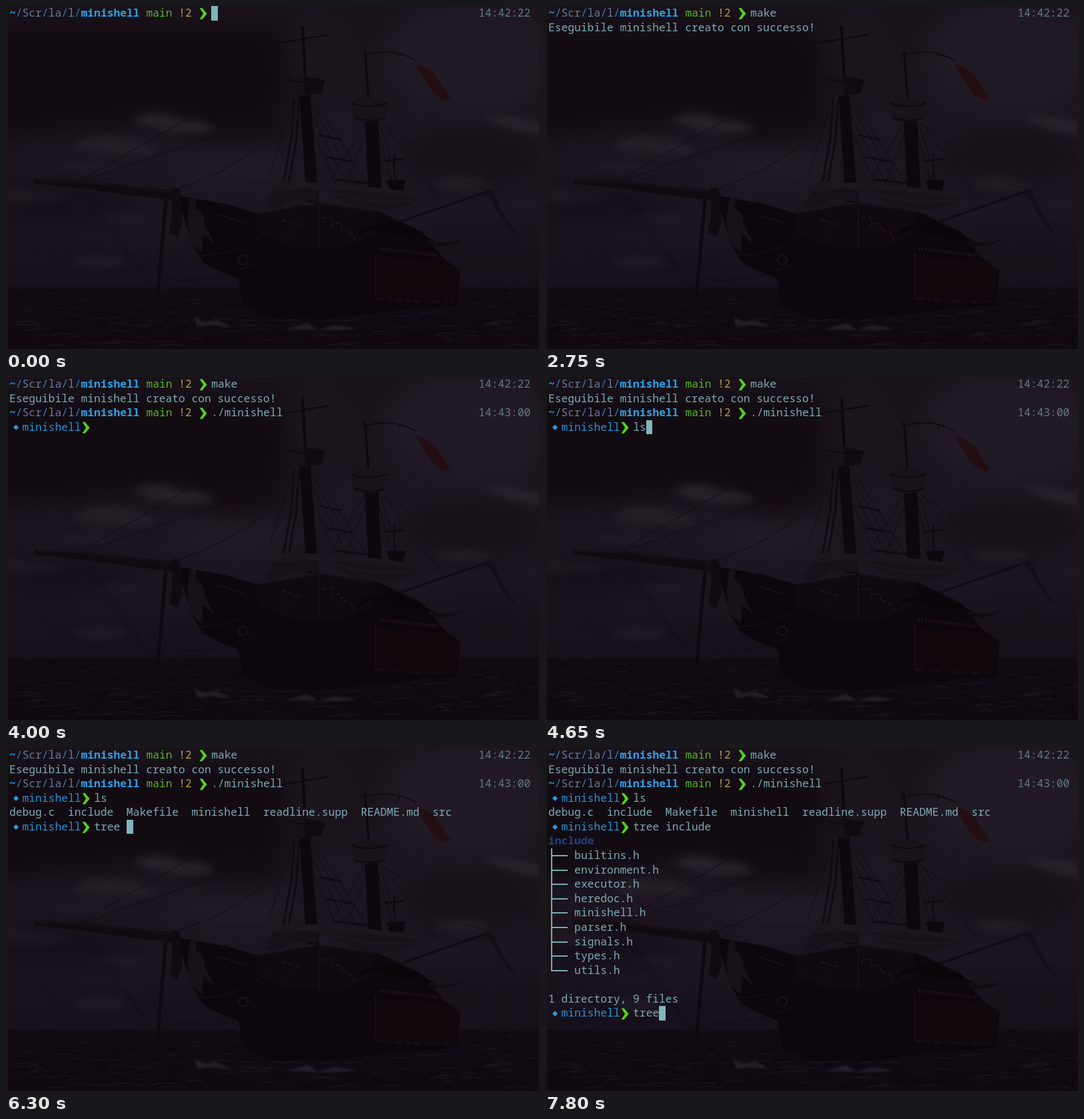
These frames come from a looping animation (800x516 px, 8000 ms). An HTML page:

```html
<!DOCTYPE html>
<html lang="it">
<head>
<meta charset="utf-8">
<title>minishell</title>
<style>
  :root { --fg: #7bacb3; --row: 21.58px; }
  html, body { margin: 0; width: 100%; height: 100%; overflow: hidden; background: #171018; }
  #stage { position: relative; width: 800px; height: 516px; overflow: hidden; }
  #scene { position: absolute; left: 0; top: 0; }
  #term span {
    position: absolute; height: var(--row); white-space: pre; color: var(--fg);
    font: 16.3px/var(--row) "Noto Sans Mono", "DejaVu Sans Mono", monospace;
  }
  #term .path { color: #667ba0; }
  #term .slash { color: #2f82b4; }
  #term .dir { color: #2ba3e8; font-weight: bold; }
  #term .branch { color: #56b722; }
  #term .dirty { color: #b3a04e; }
  #term .clock { color: #647b80; }
  #term .name { color: #2394dc; }
  #term .folder { color: #1b4680; font-weight: bold; }
  #term .arrow, #term .gem { color: transparent; overflow: hidden; width: 14px; }
  #term .arrow {
    background: #55d01d;
    clip-path: polygon(2px 3px, 6px 3px, 13px 11.5px, 6px 20px, 2px 20px, 7.5px 11.5px);
  }
  #term .gem { width: 20px; background: #2c9ee0; clip-path: polygon(10px 7px, 14px 11px, 10px 15px, 6px 11px); }
  #term .tee, #term .end {
    width: 29.3px; color: transparent; background-repeat: no-repeat;
    background-image: linear-gradient(var(--fg), var(--fg)), linear-gradient(var(--fg), var(--fg));
    background-position: 4px 0, 4px 10px;
    background-size: 2px 100%, 25.3px 2px;
  }
  #term .end { background-size: 2px 12px, 25.3px 2px; }
  #term #cursor { width: 9.8px; background: #80b5bb; }
</style>
</head>
<body>
<div id="stage">
  <svg id="scene" width="800" height="516" viewBox="0 0 800 516" fill="none" color-interpolation-filters="sRGB">
    <defs>
      <linearGradient id="sky" x2="0" y2="1">
        <stop offset="0" stop-color="#1a131b"/>
        <stop offset=".45" stop-color="#1d151f"/>
        <stop offset=".75" stop-color="#1c141e"/>
        <stop offset="1" stop-color="#170f19"/>
      </linearGradient>
      <linearGradient id="sea" x2="0" y2="1">
        <stop offset="0" stop-color="#130b14"/>
        <stop offset="1" stop-color="#110912"/>
      </linearGradient>
      <filter id="soft" x="-50%" y="-100%" width="200%" height="300%"><feGaussianBlur stdDeviation="18"/></filter>
      <filter id="mist" x="-50%" y="-100%" width="200%" height="300%"><feGaussianBlur stdDeviation="6"/></filter>
      <filter id="spray" x="-20%" y="-100%" width="140%" height="300%"><feGaussianBlur stdDeviation="1.5"/></filter>
    </defs>

    <rect width="800" height="424" fill="url(#sky)"/>
    <g filter="url(#soft)">
      <path d="M-40 30H410L425 130L390 185L250 165L150 180L-40 200z" fill="#130b12"/>
      <ellipse cx="345" cy="180" rx="80" ry="25" fill="#140c14"/>
      <ellipse cx="700" cy="75" rx="130" ry="85" fill="#211a24"/>
      <ellipse cx="470" cy="60" rx="50" ry="60" fill="#1c151e"/>
      <ellipse cx="345" cy="240" rx="100" ry="32" fill="#211923"/>
      <ellipse cx="700" cy="225" rx="100" ry="28" fill="#161017"/>
      <ellipse cx="80" cy="300" rx="110" ry="25" fill="#160e18"/>
      <ellipse cx="200" cy="340" rx="120" ry="18" fill="#1d1620"/>
      <ellipse cx="730" cy="390" rx="90" ry="25" fill="#18111a"/>
    </g>
    <g filter="url(#mist)">
      <path d="M190 172q35-20 70 0q35-4 55 14q-60 14-125-14z" fill="#28212a"/>
      <path d="M100 214q30-28 80-14q35 4 48 22q-70 6-128-8z" fill="#251e27"/>
      <path d="M715 165q30-4 90 12v16q-50-4-90-28z" fill="#29222b"/>
      <path d="M0 268q50 18 100 12l-30 14h-70z" fill="#1f1821"/>
      <path d="M640 265q50-14 90 6q-50 14-90-6z" fill="#241d26"/>
      <path d="M60 240q70-8 130 4q-60 12-130-4zM130 318q50-8 90 2q-40 10-90-2z" fill="#211a23"/>
      <ellipse cx="140" cy="385" rx="40" ry="9" fill="#201a24"/>
    </g>

    <rect y="423" width="800" height="93" fill="url(#sea)"/>
    <g id="waves" stroke-width="1.8"></g>

    <!-- rigging -->
    <g stroke="#110a11">
      <path d="M112 262L275 168M118 262L333 188M258 275Q330 252 385 208M115 280Q160 350 222 424M125 283L205 400M232 410Q290 418 350 400M562 176L612 208M568 180L650 290M395 255L432 140"/>
      <path d="M462 140L545 272M461 150L528 270M460 165L512 268M459 185L495 266M538 178L484 268M541 190L510 268M562 180L590 270M560 195L580 268"/>
      <path d="M433 138L428 200L415 275M440 140L436 200L424 270" stroke-width="3"/>
      <path d="M470 194L503 201M480 227L520 234M494 261L546 267M568 233L598 230" stroke-width="3"/>
    </g>

    <!-- masts -->
    <g fill="#0e070d" stroke="#0e070d">
      <path d="M445 30L449 106" stroke-width="4"/>
      <path d="M408 56L485 43" stroke-width="2"/>
      <path d="M539 68L544 138" stroke-width="3"/>
      <path d="M441 132h15l13 163h-17z"/>
      <path d="M539 170h19l6 122h-19z"/>
      <path d="M583 222V262" stroke-width="2"/>
      <path d="M572 262h28l-5 16h-18z"/>
    </g>
    <path d="M423 109q12-6 30-4l26 6l-6 20q-24 8-44 1z" fill="#171017"/>
    <path d="M448 106l31 6l-6 20l-24 2z" fill="#110a10"/>
    <path d="M518 145q24-14 54 0l-3 24q-24 10-46 2z" fill="#191219"/>
    <path d="M518 146q26 10 54 0M522 168q26 8 47 0M424 110q22 8 54 2" stroke="#0e070d" stroke-width="2"/>
    <path d="M535 75Q577 60 616 82M537 67l3 13M560 68l2 5M592 70l-2 7" stroke="#130a10" stroke-width="2"/>
    <path d="M614 87Q634 92 648 108Q656 124 668 139L659 142L644 134Q632 118 614 87z" fill="#230e14"/>

    <!-- hull -->
    <path d="M245 283L330 298L376 312L470 296L560 309L625 340L655 378L682 399L676 450L590 458L480 471L395 470L356 450L349 410L318 398L295 385L280 360L264 310z" fill="#0d060c"/>
    <path d="M376 312L470 296L555 309L552 345L500 366L430 364L375 340z" fill="#110910"/>
    <path d="M552 378L655 384L681 400L673 446L552 440z" fill="#11080e"/>
    <path d="M320 314l40 13M470 300V365M555 372V436" stroke="#171017" stroke-width="2"/>
    <path d="M376 312L470 297L556 310" stroke="#1a1219"/>
    <path d="M286 375Q340 378 392 340M345 398Q390 390 430 335" stroke="#1a1219"/>
    <path d="M414 322l30 8M475 320q18-8 15 10q14-10 14 8q14-4 20 14" stroke="#221518" stroke-width="2" stroke-dasharray="7 3"/>
    <path d="M560 365L648 375" stroke="#1c1115" stroke-width="5" stroke-dasharray="3 2"/>
    <circle cx="356" cy="382" r="7" stroke="#171017" stroke-width="3"/>
    <path d="M555 440Q610 446 670 445" stroke="#201821" stroke-width="2" stroke-dasharray="13 6 5 4" filter="url(#spray)"/>
    <path d="M525 350q25-24 50-6l70 10-60-30-50 10z" fill="#0b050a"/>
    <path d="M630 352q30 10 58-3q-18 16-50 12z" fill="#130b12"/>

    <!-- sails and spars -->
    <path d="M410 280L468 272V294L430 291L410 304H388L402 276z" fill="#171018"/>
    <path d="M478 274Q560 278 626 286Q600 311 545 307Q500 297 478 274z" fill="#19121a"/>
    <path d="M285 270Q380 262 470 266Q560 271 628 284L625 289Q550 277 470 276Q370 270 285 275z" fill="#1d161e"/>
    <path d="M480 276Q530 300 610 292" stroke="#1f1820" stroke-width="2"/>
    <path d="M590 325L728 277" stroke="#100910" stroke-width="3"/>
    <path d="M590 325L725 278M690 265L722 276" stroke="#150d14"/>
    <path d="M714 280L730 277L744 308L768 345L756 337L738 310L728 290z" fill="#150e16"/>
    <path d="M43 260L110 262L190 271L262 279V294L180 284L110 274L43 267z" fill="#110a10"/>
    <path d="M48 262L110 264L190 273L255 281" stroke="#181118" stroke-width="2"/>
    <path d="M240 292L227 440" stroke="#0f080e" stroke-width="5"/>
    <path d="M248 274h12l5 52-8 22-12-8 5-28z" fill="#120a11"/>
    <path d="M276 292q8-7 10 3l-2 9q15 8 14 24l15 30-17-15-2 28-14-12q-12-28-4-66z" fill="#181118"/>

    <path d="M283 468l14 7 20-3 22 12-30-4-22 3zM420 486l32-9 16 10 24-7 36 5-30 3z" fill="#241d26" filter="url(#spray)"/>
    <rect width="3" height="516" fill="#18171a"/>
  </svg>
  <div id="term"><span id="cursor"></span></div>
</div>
<script>
const LOOP = 8000, CELL = 9.78, ROW = 21.58, LEFT = 5;
const term = document.getElementById('term');
const cursor = document.getElementById('cursor');
const items = [];
const cursorKeys = [];

function place(el, row, col) {
  el.style.left = LEFT + col * CELL + 'px';
  el.style.top = row * ROW + 'px';
}

// keys: [time, number of characters shown]
function add(row, col, text, cls, keys) {
  const el = document.createElement('span');
  el.className = cls;
  place(el, row, col);
  term.insertBefore(el, cursor);
  items.push({ el, text, keys });
}

const put = (at, row, col, text, cls = '') => add(row, col, text, cls, [[at, text.length]]);
const moveCursor = (at, row, col) => cursorKeys.push([at, row, col]);
const hideCursor = at => cursorKeys.push([at, -1, 0]);

function type(row, col, text, keys) {
  add(row, col, text, '', keys);
  for (const [at, n] of keys) moveCursor(at, row, col + n);
}

function shellPrompt(at, row, clock) {
  put(at, row, 0, '~', 'dir');
  put(at, row, 1, '/   /  / /', 'slash');
  put(at, row, 2, 'Scr la l', 'path');
  put(at, row, 11, 'minishell', 'dir');
  put(at, row, 21, 'main', 'branch');
  put(at, row, 26, '!2', 'dirty');
  put(at, row, 29, '❯', 'arrow');
  put(at, row, 72, clock, 'clock');
}

function miniPrompt(at, row) {
  put(at, row, 0, '🔹', 'gem');
  put(at, row, 2, 'minishell', 'name');
  put(at, row, 11, '❯', 'arrow');
}

shellPrompt(0, 0, '14:42:22');
type(0, 31, 'make', [[0, 0], [400, 1], [650, 2], [850, 3], [1050, 4]]);
moveCursor(1250, 1, 0);
put(2300, 1, 0, 'Eseguibile minishell creato con successo!');
hideCursor(2300);

shellPrompt(2950, 2, '14:43:00');
type(2, 31, './minishell', [[2950, 0], [3150, 3], [3350, 7], [3550, 11]]);
miniPrompt(3800, 3);
hideCursor(3800);

type(3, 13, 'ls', [[4200, 0], [4400, 1], [4600, 2]]);
put(4850, 4, 0, 'debug.c  include  Makefile  minishell  readline.supp  README.md  src');
miniPrompt(4850, 5);
moveCursor(4850, 5, 13);
hideCursor(5250);

type(5, 13, 'tree include', [[5450, 1], [5650, 2], [5900, 3], [6100, 4], [6300, 5], [6500, 6], [6700, 12]]);
put(6950, 6, 0, 'include', 'folder');
'builtins environment executor heredoc minishell parser signals types utils'.split(' ').forEach((name, i, all) => {
  const last = i === all.length - 1;
  put(6950, 7 + i, 0, last ? '└──' : '├──', last ? 'end' : 'tee');
  put(6950, 7 + i, 4, name + '.h');
});
put(6950, 17, 0, '1 directory, 9 files');
miniPrompt(6950, 18);
type(18, 13, 'tree', [[6950, 0], [7150, 1], [7350, 2], [7550, 3], [7800, 4]]);

const latest = (keys, t) => keys.filter(k => k[0] <= t).pop();

function draw(t) {
  for (const { el, text, keys } of items) {
    const key = latest(keys, t);
    const shown = key ? text.slice(0, key[1]) : '';
    if (el.textContent !== shown) el.textContent = shown;
    el.style.visibility = shown ? 'visible' : 'hidden';
  }
  const [, row, col] = latest(cursorKeys, t);
  cursor.style.visibility = row < 0 ? 'hidden' : 'visible';
  place(cursor, row, col);
}

// Seeded ripples, larger towards the viewer
function ripples() {
  let seed = 7;
  const rnd = () => (seed = seed * 16807 % 2147483647) / 2147483647;
  let light = '', dark = '';
  for (let i = 0; i < 320; i++) {
    const depth = rnd(), w = 10 + depth * 40 * rnd();
    const d = `M${(rnd() * 800).toFixed(1)} ${(426 + depth * 88).toFixed(1)}q${(w / 2).toFixed(1)} ${(-1 - depth * 4).toFixed(1)} ${w.toFixed(1)} 0`;
    if (i % 3) dark += d; else light += d;
  }
  document.getElementById('waves').innerHTML =
    `<path d="${dark}" stroke="#0e0710"/><path d="${light}" stroke="#1a121b"/>`;
}

ripples();
const start = performance.now();
function tick() {
  draw((performance.now() - start) % LOOP);
  requestAnimationFrame(tick);
}
tick();
</script>
</body>
</html>
```
